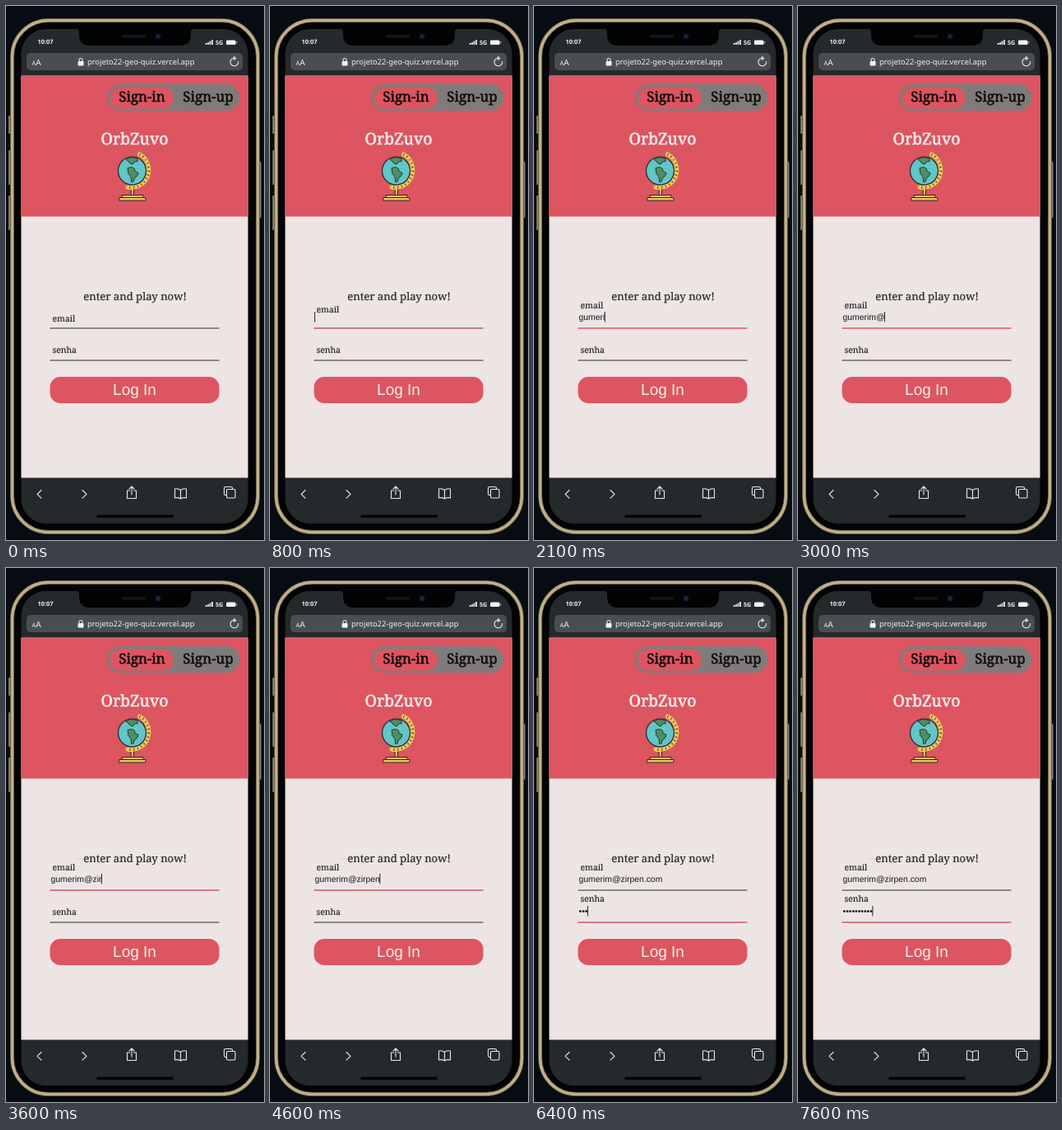
An HTML page that plays this animation: 314 px wide and 648 px high, repeating every 8 s.

```html
<!DOCTYPE html>
<html lang="pt">
<head>
<meta charset="utf-8">
<title>Login</title>
<style>
  html, body { margin: 0; width: 100%; height: 100%; overflow: hidden; background: #070b12; }
  svg { display: block; }
  text { text-rendering: geometricPrecision; white-space: pre; }
  .serif { font-family: "Noto Serif", serif; fill: #2a282b; stroke: #2a282b; stroke-width: .2; }
  .tab { font-size: 17px; fill: #100c0d; stroke: #100c0d; stroke-width: .6; }
  .title { font-size: 19.5px; fill: #f4ecea; stroke: #f4ecea; stroke-width: .6; }
  .sans { font-family: "Noto Sans", sans-serif; fill: #f2f2f2; }
  .input { font: 10.4px "Liberation Sans", Arial, sans-serif; fill: #16161c; }
  .icon { fill: none; stroke: #e8eaeb; stroke-width: 1.1; stroke-linecap: round; stroke-linejoin: round; }
</style>
</head>
<body>
<svg width="314" height="648" viewBox="0 0 314 648">
  <!-- phone body -->
  <g fill="#857a60">
    <rect x="3" y="133" width="3" height="22" rx="1"/>
    <rect x="3" y="175" width="3" height="42" rx="1"/>
    <rect x="3" y="230" width="3" height="42" rx="1"/>
    <rect x="308" y="189" width="2.5" height="68" rx="1" fill="#7f8891"/>
  </g>
  <rect x="7.5" y="17.5" width="299" height="621" rx="44" fill="#020304" stroke="#5d5238" stroke-width="5"/>
  <rect x="7.5" y="17.5" width="299" height="621" rx="44" fill="none" stroke="#bfb08a" stroke-width="3.4"/>
  <rect x="18.5" y="28" width="276" height="600" rx="30" fill="#24292c"/>
  <path d="M85 27H229Q225 28 225 32V35Q225 48 212 48H102Q89 48 89 35V32Q89 28 85 27Z" fill="#020304"/>
  <rect x="141" y="35" width="30" height="3.5" rx="1.7" fill="#15181b"/>
  <circle cx="185" cy="37" r="3.5" fill="#11182a"/>
  <circle cx="185" cy="37" r="1.4" fill="#263a68"/>

  <!-- status and address bars -->
  <text class="sans" x="38.5" y="46" font-size="7.4" font-weight="700">10:07</text>
  <path d="M243.5 47v-2M246 47v-3M248.5 47v-4.5M251 47v-6" stroke="#f2f2f2" stroke-width="1.7"/>
  <text class="sans" x="255" y="47" font-size="7.2" font-weight="600">5G</text>
  <rect x="268" y="41.5" width="11.5" height="5.5" rx="1.5" fill="#f5f5f5"/>
  <rect x="280.2" y="43" width="1.2" height="2.5" fill="#aaa"/>
  <rect x="25" y="57" width="263" height="21" rx="5" fill="#4a4e51"/>
  <text class="sans" x="31.5" y="71.5" font-size="7.5">A<tspan font-size="10">A</tspan></text>
  <rect x="87.5" y="67" width="7" height="5.5" rx="1" fill="#f2f2f2"/>
  <path d="M89 67v-1.5a2 2 0 0 1 4 0V67" class="icon"/>
  <text class="sans" x="99" y="71" font-size="9.3">projeto22-geo-quiz.vercel.app</text>
  <path d="M282.6 67.5a4.8 4.8 0 1 1-3-4l-2.3-2.2M279.8 63.6l-2.6 1.6" class="icon"/>

  <!-- page -->
  <rect x="18.5" y="84" width="276" height="1" fill="#6f7f80"/>
  <rect x="18.5" y="85" width="276" height="487.5" fill="#ede5e4"/>
  <rect x="18.5" y="85" width="276" height="170.5" fill="#dd5561"/>
  <rect x="123" y="95" width="161.5" height="32" rx="16" fill="#7f7b7a"/>
  <rect x="126.5" y="98.5" width="77.5" height="26" rx="13" fill="#dd5561"/>
  <g class="serif" text-anchor="middle">
    <text class="tab" x="165.5" y="116">Sign-in</text>
    <text class="tab" x="246" y="116">Sign-up</text>
    <text class="title" x="156.5" y="168">OrbZuvo</text>
    <text x="157" y="357" font-size="13.1">enter and play now!</text>
  </g>

  <!-- globe -->
  <g stroke="#2b2630" stroke-linejoin="round" stroke-linecap="round">
    <path d="M152.5 221h3v9h-3z" fill="#f2c35c"/>
    <path d="M141.5 229.5h25.500v3H141.500zM138 232.500h32v3.500h-32z" fill="#f2c35c"/>
    <path id="arc" d="M162.500 180A21.500 21.500 0 0 1 148 220" fill="none" stroke-width="5.500"/>
    <use href="#arc" style="stroke:#f2c35c"/>
    <path d="M162.500 180A21.500 21.500 0 0 1 148 220" fill="none" stroke="#f2c35c" stroke-width="3.500"/>
    <path d="M162.500 180A21.500 21.500 0 0 1 148 220" fill="none" stroke-width="3" stroke-dasharray=".8 4" stroke-linecap="butt"/>
    <circle cx="153.500" cy="200" r="17" fill="#62c6c6" stroke-width="1.200"/>
    <path d="M146 186l5-2.500 8.500 1 1 4-4 .5-2 3-3.500-1-2-2.500zM148.500 196.500l4.500-1 3.500 2 .5 3 4 2-1.500 4-3 2-1.500 4.500-2.500.5-.5-6-3-4z" fill="#4d8f62" stroke-width=".9"/>
  </g>

  <!-- form -->
  <path id="line0" d="M53.500 391h206" stroke-width="1.700"/>
  <path id="line1" d="M53.500 430h206" stroke-width="1.700"/>
  <text id="label0" class="serif" x="56.500" font-size="10.400">email</text>
  <text id="label1" class="serif" x="56.500" font-size="10.400">senha</text>
  <text id="input0" class="input" x="54.500" y="381"></text>
  <text id="input1" class="input" x="54.500" y="420"></text>
  <rect id="caret" width="1" height="12.500" fill="#222"/>
  <rect x="53.500" y="450" width="206" height="32" rx="12.500" fill="#dd5561"/>
  <text x="156.500" y="472" font-size="19" text-anchor="middle" fill="#f6eeed" font-family="Liberation Sans, Arial, sans-serif">Log In</text>

  <!-- browser toolbar -->
  <g class="icon">
    <path d="M43 587.500l-5 4.800 5 4.800M93 587.500l5 4.800-5 4.800"/>
    <path d="M150.500 588h-3v9.500h11V588h-3M153 593v-10M150 586l3-3 3 3"/>
    <path d="M212.500 587.500q-3-2.500-7-1.500v11q4-1 7 1 3-2 7-1v-11q-4-1-7 1.500v10.500"/>
    <path d="M268.500 593.500h-1.500q-1.500 0-1.500-1.500v-7q0-1.500 1.500-1.500h7q1.500 0 1.500 1.500v1.500"/>
    <rect x="268.500" y="586.500" width="10.500" height="10.500" rx="1.500"/>
  </g>
  <rect x="110" y="617.500" width="94" height="3.500" rx="1.700" fill="#020304"/>
</svg>
<script>
const LOOP = 8000, FADE = 500;
const FOCUS = [600, 5535];
const REST_Y = [383, 421], CARET_Y = [371, 410];
const GREY = [113, 106, 109], RED = [221, 85, 97];
const VALUES = ["gumerim@zirpen.com", "•".repeat(10)];
// moment of each key press, in ms
const KEYS = [
  [1400, 1500, 1600, 1900, 2000, 2100, 2400, 2800, 3200, 3400, 3600, 3900, 4000, 4600, 4900, 5100, 5300, 5400],
  [6100, 6200, 6400, 6500, 6700, 6800, 7100, 7100, 7400, 7600]
];
const el = id => document.getElementById(id);

// CSS "ease": cubic-bezier(.25, .1, .25, 1)
function ease(x) {
  if (x <= 0) return 0;
  if (x >= 1) return 1;
  const bezier = (s, a, b) => 3 * s * (1 - s) ** 2 * a + 3 * s * s * (1 - s) * b + s ** 3;
  let low = 0, high = 1;
  for (let i = 0; i < 16; i++) {
    const mid = (low + high) / 2;
    if (bezier(mid, .25, .25) < x) low = mid; else high = mid;
  }
  return bezier(low, .1, 1);
}

function draw(t) {
  const active = t >= FOCUS[1] ? 1 : 0;
  FOCUS.forEach((start, i) => {
    const lift = ease((t - start) / FADE);
    const glow = i ? lift : lift - ease((t - FOCUS[1]) / FADE);
    const color = GREY.map((c, k) => Math.round(c + (RED[k] - c) * glow));
    el("label" + i).setAttribute("y", REST_Y[i] - 16 * lift);
    el("line" + i).setAttribute("stroke", `rgb(${color})`);
    el("input" + i).textContent = VALUES[i].slice(0, KEYS[i].filter(k => k <= t).length);
  });
  // the caret blinks, restarting at each key press
  const last = Math.max(FOCUS[active], ...KEYS[active].filter(k => k <= t));
  const visible = t >= FOCUS[0] && (t - last) % 1100 < 600;
  const caret = el("caret");
  caret.setAttribute("x", 54 + el("input" + active).getComputedTextLength());
  caret.setAttribute("y", CARET_Y[active]);
  caret.setAttribute("visibility", visible ? "visible" : "hidden");
}

function frame() {
  draw(performance.now() % LOOP);
  requestAnimationFrame(frame);
}
frame();
</script>
</body>
</html>
```
